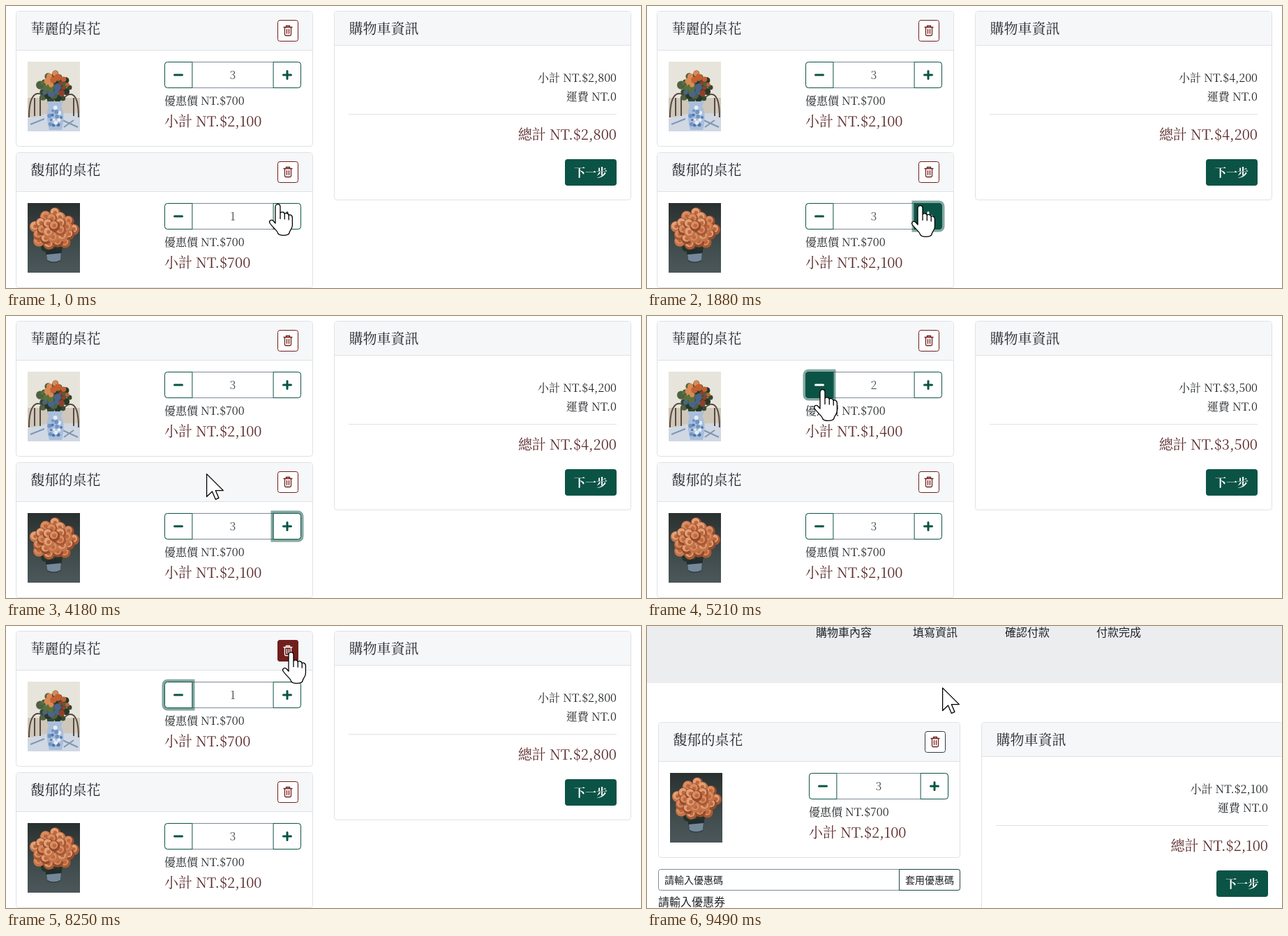
Recreate the animation shown at these times as an HTML page. Size 910 px wide and 405 px high, loop 9.57 s.

```html
<!DOCTYPE html>
<html lang="zh-Hant">
<head>
<meta charset="utf-8">
<title>購物車</title>
<style>
html, body { margin: 0; width: 100%; height: 100%; overflow: hidden; background: #fff; }
svg { display: block; width: 100%; height: 100%; }
text { font: 16px "Noto Serif CJK TC", "Noto Serif TC", "Noto Serif CJK JP", "Noto Serif", serif; fill: #212529; }
.big { font-size: 20px; }
.sum { fill: #5c2a2b; }
.sans { font-family: "Noto Sans CJK TC", "Noto Sans CJK", "Noto Sans", sans-serif; }
.small { font-size: 14px; }
.end { text-anchor: end; }
.mid { text-anchor: middle; fill: #495057; }
.next { fill: #fff; font-weight: 600; }
</style>
</head>
<body>
<svg id="stage" viewBox="0 0 910 405" preserveAspectRatio="none"></svg>
<script>
const LOOP = 9570, PRICE = 700;
const GREEN = '#0b5345', RED = '#701f1c', LINE = '#dfe1e4';
const $ = id => document.getElementById(id);
const money = n => 'NT.$' + n.toLocaleString('en-US');

let seed = 11;
const random = () => (seed = seed * 16807 % 2147483647) / 2147483647;

// Draws items over an ellipse in a sunflower spiral, from the rim inwards
function spiral(count, cx, cy, rx, ry, item) {
  let out = '';
  for (let i = 0; i < count; i++) {
    const angle = i * 2.4, reach = Math.sqrt(1 - i / count);
    const x = cx + rx * reach * Math.cos(angle), y = cy + ry * reach * Math.sin(angle);
    out += `<g transform="translate(${x.toFixed(1)} ${y.toFixed(1)})">${item(i)}</g>`;
  }
  return out;
}

const dots = (size, colors) => i =>
  `<circle r="${(size * (.7 + random() * .6)).toFixed(1)}" fill="${colors[i % colors.length]}"/>`;

const rose = i => `<circle r="8" fill="${['#a85a36', '#c3744a', '#954b2c'][i % 3]}"/>
  <circle cx="-.8" cy="-1.5" r="5.8" fill="${['#e2a076', '#d98d60'][i % 2]}"/>
  <circle cy="-.5" r="2.8" fill="#c0673d"/>`;

const defs = `<defs>
  <linearGradient id="dusk" x2="0" y2="1"><stop stop-color="#2a3030"/><stop offset=".65" stop-color="#414d4d"/><stop offset="1" stop-color="#4b575a"/></linearGradient>
  <clipPath id="frame"><path d="M0 0H75V100H0z"/></clipPath>
  <g id="mixed" clip-path="url(#frame)">
    <path d="M0 0H75V100H0z" fill="#e7e4db"/>
    <path d="M0 52H75V80H0z" fill="#cfc8ba"/>
    <path d="M0 82L30 74H75V100H0z" fill="#cfd8e3"/>
    <path d="M2 80C2 44 14 40 26 52M10 78V52M18 78V50M73 80C73 44 62 42 52 52M66 78V52" fill="none" stroke="#594a40" stroke-width="2"/>
    <path d="M4 90L24 82M50 84L72 94M52 94L66 84" stroke="#8097b4" stroke-width="2"/>
    ${spiral(26, 38, 37, 22, 21, dots(5, ['#35482f', '#4f6140', '#283827']))}
    ${spiral(18, 38, 33, 19, 17, dots(4, ['#c65f32', '#4a638a', '#d98a54', '#8f3f2c', '#59703f']))}
    <path d="M27 57H51L48 64C53 72 52 86 49 98H31C28 86 26 72 30 64z" fill="#a9bedb"/>
    ${spiral(15, 39, 80, 9, 15, dots(2.4, ['#4f78b0', '#7195c2', '#e6edf5']))}
  </g>
  <g id="roses" clip-path="url(#frame)">
    <path d="M0 0H75V100H0z" fill="url(#dusk)"/>
    <path d="M24 60H50L47 83Q37 88 28 83z" fill="#222c2e"/>
    <path d="M27 74L48 72L47 82Q37 87 28 82z" fill="#74889a"/>
    ${spiral(7, 37, 59, 17, 7, dots(5, ['#38452f', '#26332a']))}
    ${spiral(24, 37, 38, 29, 25, rose)}
  </g>
</defs>`;

// A button whose hovered look lies on top of its plain one
const button = (id, place, shape, icon, color, weight, edge = color) => `<g id="${id}" transform="${place}" stroke-linecap="round">
  <path class="ring" d="${shape}" fill="none" stroke="${color}" stroke-opacity=".5" stroke-width="8" opacity="0"/>
  <path d="${shape}" fill="#fff" stroke="${edge}"/>
  <path d="${icon}" fill="none" stroke="${color}" stroke-width="${weight}"/>
  <g class="hot" opacity="0"><path d="${shape}" fill="${color}" stroke="${color}"/>
  <path d="${icon}" fill="none" stroke="#fff" stroke-width="${weight}"/></g></g>`;

const SIDE = 'M39.5.5H4.5a4 4 0 0 0-4 4v29a4 4 0 0 0 4 4h35z';
const MINUS = 'M14.5 19H25.5', PLUS = MINUS + 'M20 13.5V24.5';
const BIN = 'M9 10.5H21M12.5 10V8.5H17.5V10M10.5 11V21Q10.5 22.5 12 22.5H18Q19.5 22.5 19.5 21V11M13.5 13.5V19.5M16.5 13.5V19.5';
const BOX = 'M3.5.5H26.5a3 3 0 0 1 3 3V27.5a3 3 0 0 1-3 3H3.5a3 3 0 0 1-3-3V3.5a3 3 0 0 1 3-3z';

const panel = (w, h, head, title) => `
  <rect x=".5" y=".5" width="${w - 1}" height="${h - 1}" rx="4" fill="#fff" stroke="${LINE}"/>
  <path d="M1 ${head}V4a3 3 0 0 1 3-3H${w - 4}a3 3 0 0 1 3 3V${head}z" fill="#f6f7f9"/>
  <path d="M1 ${head}.5H${w - 1}" stroke="${LINE}"/>
  <text class="big" x="21.5" y="32.5">${title}</text>`;

function itemCard(id, x, y, w, title, art, edge) {
  const left = Math.floor(w / 2), right = w - 17;
  return `<g transform="translate(${x} ${y})">${panel(w, 195, 56, title)}
    ${button(id + 'Bin', `translate(${w - 51} 13)`, BOX, BIN, RED, 1.3, edge)}
    <use href="#${art}" x="17" y="73"/>
    <rect x="${left + .5}" y="73.5" width="${right - left - 1}" height="37" rx="4" fill="#fff" stroke="#7f8b97"/>
    <text id="${id}Qty" class="mid" x="${(left + right) / 2}" y="98"></text>
    ${button(id + 'Plus', `translate(${right} 73) scale(-1 1)`, SIDE, PLUS, GREEN, 3)}
    ${button(id + 'Minus', `translate(${left} 73)`, SIDE, MINUS, GREEN, 3)}
    <text x="${left}" y="135">優惠價 ${money(PRICE)}</text>
    <text id="${id}Sum" class="big sum" x="${left}" y="165.5"></text></g>`;
}

const summary = (id, x, y, w) => `<g transform="translate(${x} ${y})">${panel(w, 272, 49, '購物車資訊')}
  <text id="${id}Net" class="end" x="${w - 21}" y="101.5"></text>
  <text class="end" x="${w - 21}" y="128.5">運費 NT.0</text>
  <path d="M21 148.5H${w - 21}" stroke="${LINE}"/>
  <text id="${id}Total" class="big sum end" x="${w - 21}" y="184.5"></text>
  <rect x="${w - 95}" y="213" width="74" height="38" rx="4" fill="${GREEN}"/>
  <text class="next" x="${w - 82}" y="238">下一步</text></g>`;

const menuItem = (label, x, weight) =>
  `<text class="sans" x="${x}" y="15" style="font-weight:${weight}">${label}</text>`;

$('stage').innerHTML = defs + `
<g id="before">
  ${itemCard('a', 14, 7, 426, '華麗的桌花', 'mixed')}
  ${itemCard('b', 14, 210, 426, '馥郁的桌花', 'roses')}
  ${summary('s', 470, 7, 426)}
</g>
<g id="after">
  <path d="M0 0H910V82H0z" fill="#ebedef"/>
  ${menuItem('購物車內容', 242, 500)}
  ${menuItem('填寫資訊', 381, 300)}
  ${menuItem('確認付款', 513, 300)}
  ${menuItem('付款完成', 644, 300)}
  ${itemCard('c', 16, 138, 433, '馥郁的桌花', 'roses', '#34383c')}
  ${summary('z', 479, 138, 432)}
  <rect x="16.5" y="349.5" width="432" height="30" rx="3" fill="#fff" stroke="#7f8b97"/>
  <path d="M361.5 349.5H445.5a3 3 0 0 1 3 3V376.5a3 3 0 0 1-3 3H361.5z" fill="#fff" stroke="#1d4741"/>
  <text class="sans small" x="25" y="370">請輸入優惠碼</text>
  <text class="sans small" x="370" y="370">套用優惠碼</text>
  <text class="sans" x="16" y="402">請輸入優惠券</text>
</g>
<g id="cursor" stroke="#000" stroke-width="1.3" fill="#fff" stroke-linejoin="round">
  <circle id="press" r="24" fill="#ff0" fill-opacity=".47" stroke="none"/>
  <path id="arrow" d="M.6.9V33.5L8.5 26L13.3 37.3L17.9 35.3L13.3 24.6H24.4z"/>
  <path id="hand" transform="translate(-12 0)" d="M9 4.5C9-.6 16-.6 16 4.5V14C16 11 22 11 22.3 15C22.5 12.5 28 13 28.2 17C28.5 15 33.4 15.5 33.4 20V31C33.4 36 29.5 38 29 42C27.5 46.5 14 46.5 12.5 42C11.5 38 6 35 1.2 28C-.8 24.5 3 22 6 24.5L9 28ZM16 14V22M22.3 15V22.5M28.2 17V23.5"/>
</g>`;

// Pointer tip: time, x, y
const PATH = [[0, 389, 284], [69, 389, 284], [70, 391, 284], [1159, 391, 284], [1160, 391, 286],
  [3390, 391, 286], [3640, 359, 266], [4180, 287, 226], [4390, 256, 124], [4460, 254, 117], [4800, 251, 105],
  [7630, 251, 105], [7690, 274, 101], [8130, 404, 42], [8250, 408, 37], [8709, 408, 37],
  [8710, 408, 35], [9240, 408, 35], [9490, 423, 88], [LOOP, 423, 88]];
const HANDS = [[0, 3450], [4440, 7680], [8080, 8710]];
const PRESSES = [[410, 720], [1620, 1880], [4800, 5060], [6550, 6670], [8570, 8710]];
const REMOVED = 8710;

const within = (t, spans) => spans.some(([from, to]) => t >= from && t < to);
const ramp = (t, start, span = 150) => Math.min(1, Math.max(0, (t - start) / span));
const show = (id, on) => $(id).style.display = on ? '' : 'none';
const layer = (id, name, level) => $(id).querySelector('.' + name).setAttribute('opacity', level);

function locate(t) {
  const i = PATH.findIndex(key => key[0] > t);
  const [t0, x0, y0] = PATH[i - 1], [t1, x1, y1] = PATH[i], k = (t - t0) / (t1 - t0);
  return [Math.round(x0 + (x1 - x0) * k), Math.round(y0 + (y1 - y0) * k)];
}

function setItem(id, qty) {
  $(id + 'Qty').textContent = qty;
  $(id + 'Sum').textContent = '小計 ' + money(qty * PRICE);
}

function setSummary(id, qty) {
  $(id + 'Net').textContent = '小計 ' + money(qty * PRICE);
  $(id + 'Total').textContent = '總計 ' + money(qty * PRICE);
}

function draw(t) {
  const first = 3 - (t >= 5060) - (t >= 6670);
  const second = 1 + (t >= 720) + (t >= 1880);
  setItem('a', first);
  setItem('b', second);
  setItem('c', 3);
  setSummary('s', first + second);
  setSummary('z', 3);
  show('before', t < REMOVED);
  show('after', t >= REMOVED);

  layer('bPlus', 'hot', t < 70 ? 0 : 1 - ramp(t, 3430));
  layer('bPlus', 'ring', ramp(t, 720) - ramp(t, 5060));
  layer('aMinus', 'hot', ramp(t, 4440) - ramp(t, 7690));
  layer('aMinus', 'ring', ramp(t, 5060) - ramp(t, 8570));
  layer('aBin', 'hot', ramp(t, 8090));
  layer('aBin', 'ring', ramp(t, 8570));

  const hand = within(t, HANDS);
  show('hand', hand);
  show('arrow', !hand);
  show('press', within(t, PRESSES));
  $('cursor').setAttribute('transform', `translate(${locate(t)})`);
}

const start = performance.now();
function tick() {
  draw((performance.now() - start) % LOOP);
  requestAnimationFrame(tick);
}
tick();
</script>
</body>
</html>
```
